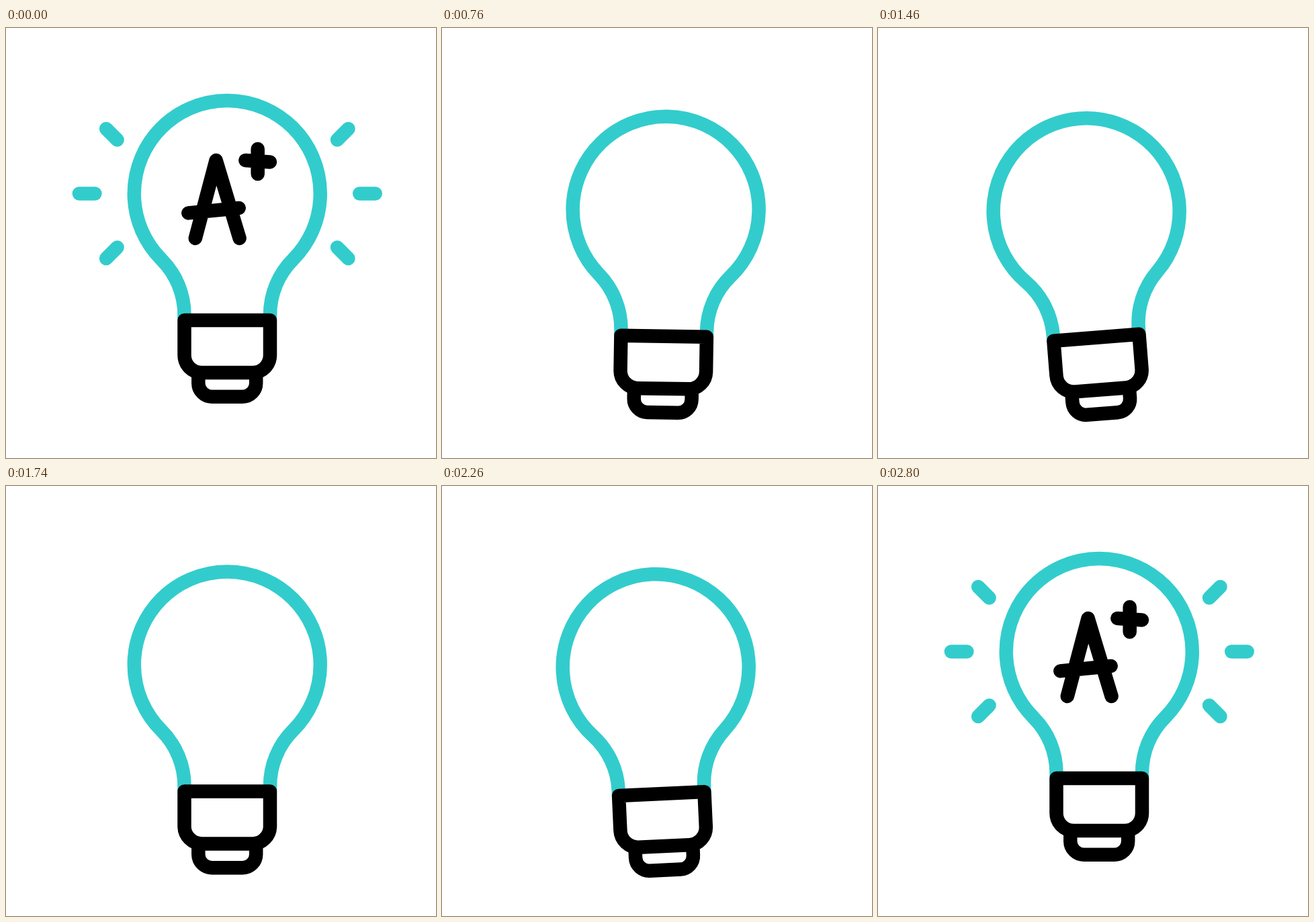
Animation, 640 px wide and 640 px high, one loop 3.02 s. Source, as an HTML page:

```html
<!DOCTYPE html>
<html lang="en">
<head>
<meta charset="utf-8">
<title>Swinging bulb</title>
<style>
  html, body { margin: 0; width: 100%; height: 100%; overflow: hidden; background: #fff; }
  svg { display: block; width: 100vw; height: 100vh; }
  path { fill: none; stroke: #000; stroke-width: 20.5; stroke-linejoin: round; }
  .round path { stroke-linecap: round; }
  .glow { stroke: #33cccc; }
</style>
</head>
<body>
<svg viewBox="0 0 640 640">
  <g id="rays" class="round"></g>
  <g id="bulb">
    <path class="glow" d="M265.5 435V427A117 117 0 0 0 231.3 344.4A138.5 138.5 0 1 1 427.2 344.4A117 117 0 0 0 393 427V435"/>
    <path d="M265.5 435H393V487a26 26 0 0 1-26 26H291.5a26 26 0 0 1-26-26Z"/>
    <path d="M286.3 513V528.7a20 20 0 0 0 20 20H352.2a20 20 0 0 0 20-20V513"/>
    <g id="grade" class="round">
      <path d="M281.8 313L312.6 197L347.6 313M271.3 275.4L346.7 268"/>
      <path d="M374.7 180V217.3M356.3 197L393 199.4"/>
    </g>
  </g>
</svg>
<script>
const LOOP = 3020, STEP = 20;
const SWING_START = 640, SWING = 440, HOLD = 2400;
const LOW = 26.2, HIGH = 12.7, TILT = 5;

const [rays, bulb, grade] = ['rays', 'bulb', 'grade'].map(id => document.getElementById(id));
const span = (t, from, to) => Math.min(1, Math.max(0, (t - from) / (to - from)));
const smooth = x => x * x * (3 - 2 * x);
const easeOut = x => 1 - (1 - x) ** 1.85;
const mix = (a, b, x) => a + (b - a) * x;

// Inner end and outward vector of each ray, mirrored around the bulb
const rayList = [];
for (const side of [-1, 1]) {
  for (const row of [-1, 0, 1]) {
    rayList.push({
      x: 329.3 + side * (row ? 163.7 : 196.9),
      y: 246.5 + row * 80,
      dx: side * (row ? 16.5 : 23.5),
      dy: row * 16.5,
      path: rays.appendChild(document.createElementNS('http://www.w3.org/2000/svg', 'path'))
    });
  }
}
rayList.forEach(r => r.path.setAttribute('class', 'glow'));

function pose(t) {
  if (t >= HOLD) {
    const rest = 1 - easeOut(span(t, 2600, 2800));
    return [-TILT * rest, LOW * rest];
  }
  if (t < SWING_START) return [0, LOW * smooth(span(t, 200, SWING_START))];
  const n = Math.floor((t - SWING_START) / SWING);
  const x = smooth((t - SWING_START) / SWING - n);
  const right = n % 2 ? 1 - x : x;
  return [mix(n ? -TILT : 0, TILT, right), mix(LOW, HIGH, right)];
}

function draw(t) {
  const [angle, drop] = pose(t);
  bulb.setAttribute('transform', `translate(0 ${drop}) rotate(${angle} 329.25 490)`);

  const away = span(t, 200, 400), back = span(t, 2600, 2800);
  grade.setAttribute('opacity', 1 - away + back);

  const size = 1 - easeOut(away) + easeOut(back);
  rays.setAttribute('visibility', size > 0 ? 'visible' : 'hidden');
  for (const { x, y, dx, dy, path } of rayList) {
    path.setAttribute('d', `M${x} ${y}l${dx * size} ${dy * size}`);
  }
}

const start = performance.now();
function tick() {
  const t = (performance.now() - start) % LOOP;
  draw(Math.floor(t / STEP) * STEP);
  requestAnimationFrame(tick);
}
tick();
</script>
</body>
</html>
```
